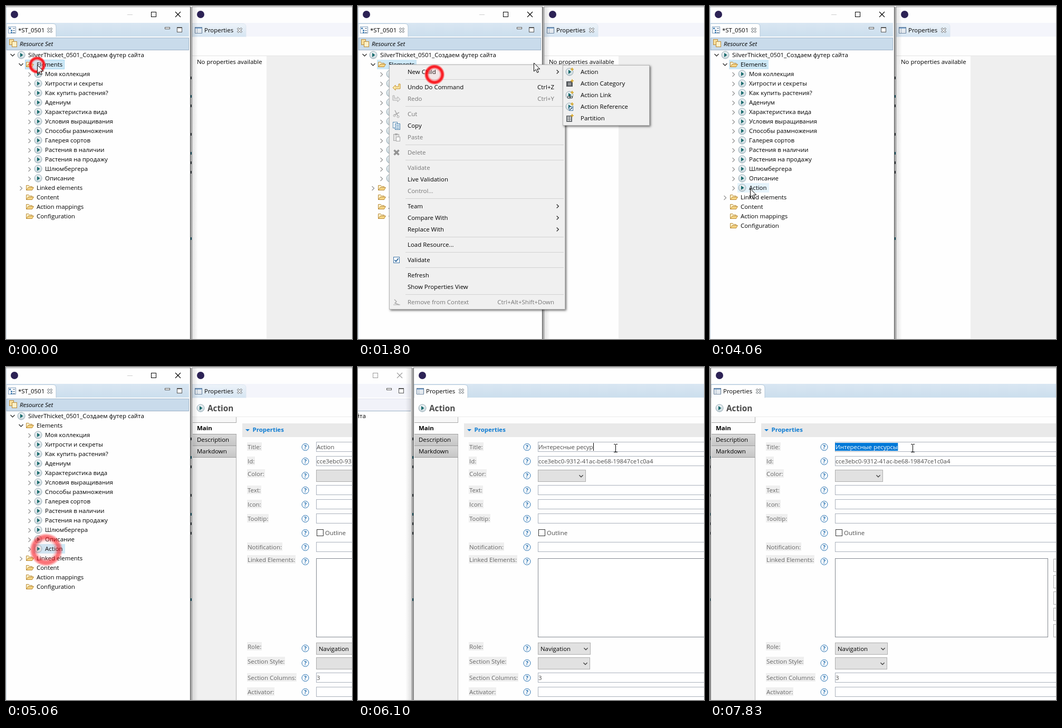
Write an HTML page with a canvas that moves like this. It is 656x632 px and loops after 8 s.

```html
<!DOCTYPE html>
<html lang="en">
<head>
<meta charset="utf-8">
<title>Tree editor demo</title>
<style>
html, body { margin: 0; width: 100%; height: 100%; overflow: hidden; background: #fff; }
canvas { display: block; }
</style>
</head>
<body>
<canvas id="stage" width="656" height="632"></canvas>
<script>
const g = document.getElementById('stage').getContext('2d');
const LOOP = 8000;
const FONT = '"Open Sans", "Noto Sans", sans-serif';
const SIZE = 11.45;

// Events on the timeline, in ms
const MENU_ON = 150, SUB_ON = 1330, MENU_OFF = 2760, ADDED = 2900;
const PICK = 4260, FORM_ON = 4480, FOCUS = 5070;
const TYPE_FROM = 5180, TYPE_STEP = 36;

const TITLE = 'Интересные ресурсы';
const CHILDREN = ['Моя коллекция', 'Хитрости и секреты', 'Как купить растения?', 'Адениум',
  'Характеристика вида', 'Условия выращивания', 'Способы размножения', 'Галерея сортов',
  'Растения в наличии', 'Растения на продажу', 'Шлюмбергера', 'Описание'];

// Cursor stops: time, x, y
const PATH = [[0, 59, 112], [850, 59, 112], [1220, 145, 130], [1480, 145, 130], [1800, 333, 108],
  [1860, 333, 108], [2340, 425, 121], [3340, 425, 121], [3860, 82, 358], [4040, 76, 347],
  [4480, 76, 347], [5000, 735, 154]];
// Clicks: time, x, y
const CLICKS = [[-440, 59, 112], [1290, 145, 130], [2410, 425, 122], [4230, 76, 347]];
const RING_MS = 1300;

// Menu rows: label, y, shortcut, kind (d = disabled, s = has submenu)
const MENU = [['New Child', 125, '', 's'], ['Undo Do Command', 154, 'Ctrl+Z'], ['Redo', 176, 'Ctrl+Y', 'd'],
  ['Cut', 205, '', 'd'], ['Copy', 227], ['Paste', 249, '', 'd'], ['Delete', 278, '', 'd'],
  ['Validate', 307, '', 'd'], ['Live Validation', 329], ['Control...', 351, '', 'd'],
  ['Team', 380, '', 's'], ['Compare With', 402, '', 's'], ['Replace With', 424, '', 's'],
  ['Load Resource...', 453], ['Validate', 482], ['Refresh', 511], ['Show Properties View', 533],
  ['Remove from Context', 562, 'Ctrl+Alt+Shift+Down', 'd']];
const SEPARATORS = [139, 190, 263, 292, 365, 438, 467, 496, 547];
const SUBMENU = ['Action', 'Action Category', 'Action Link', 'Action Reference', 'Partition'];

// Form rows: label, label y, help icon y, kind
const FIELDS = [['Title:', 152, 152, 'in'], ['Id:', 179, 179, 'in'], ['Color:', 203, 206, 'combo'],
  ['Text:', 234, 234, 'in'], ['Icon:', 261, 261, 'in'], ['Tooltip:', 288, 288, 'in'],
  ['', 315, 315, 'check'], ['Notification:', 342, 342, 'in'], ['Linked Elements:', 366, 369, 'list'],
  ['Role:', 531, 534, 'combo'], ['Section Style:', 559, 562, 'combo'],
  ['Section Columns:', 590, 590, 'in'], ['Activator:', 617, 617, 'in']];

const clamp = v => Math.max(0, Math.min(1, v));
const ease = u => (1 - Math.cos(Math.PI * clamp(u))) / 2;
const inside = (p, x0, y0, x1, y1) => p.x >= x0 && p.x < x1 && p.y >= y0 && p.y < y1;

function cursorAt(t) {
  let i = 0;
  while (i < PATH.length - 2 && t >= PATH[i + 1][0]) i++;
  const [t0, x0, y0] = PATH[i], [t1, x1, y1] = PATH[i + 1];
  const e = ease((t - t0) / (t1 - t0));
  return { x: x0 + (x1 - x0) * e, y: y0 + (y1 - y0) * e };
}

function rect(x, y, w, h, fill, stroke) {
  if (fill) { g.fillStyle = fill; g.fillRect(x, y, w, h); }
  if (stroke) { g.strokeStyle = stroke; g.lineWidth = 1; g.strokeRect(x + .5, y + .5, w - 1, h - 1); }
}
function line(pts, color, width = 1) {
  g.beginPath();
  pts.forEach(([x, y]) => g.lineTo(x, y));
  g.strokeStyle = color; g.lineWidth = width; g.stroke();
}
function poly(pts, fill, stroke, width = 1) {
  g.beginPath();
  pts.forEach(([x, y]) => g.lineTo(x, y));
  g.closePath();
  if (fill) { g.fillStyle = fill; g.fill(); }
  if (stroke) { g.strokeStyle = stroke; g.lineWidth = width; g.stroke(); }
}
function disc(x, y, r, fill, stroke) {
  g.beginPath(); g.arc(x, y, r, 0, 7);
  if (fill) { g.fillStyle = fill; g.fill(); }
  if (stroke) { g.strokeStyle = stroke; g.lineWidth = 1; g.stroke(); }
}
function gradient(x0, y0, x1, y1, a, b) {
  const grad = g.createLinearGradient(x0, y0, x1, y1);
  grad.addColorStop(0, a); grad.addColorStop(1, b);
  return grad;
}
const vgrad = (y0, y1, a, b) => gradient(0, y0, 0, y1, a, b);

function setFont(style = '', size = SIZE) { g.font = `${style} ${size}px ${FONT}`; }
function text(s, x, y, color = '#000', style = '', size = SIZE, align = 'left') {
  setFont(style, size);
  g.fillStyle = color; g.textAlign = align;
  g.fillText(s, x, Math.round(y + size * .36));
}
function width(s) { setFont(); return g.measureText(s).width; }
function cross(x, y, r, color, w) {
  line([[x - r, y - r], [x + r, y + r]], color, w);
  line([[x - r, y + r], [x + r, y - r]], color, w);
}
function chevron(x, y, dir, color, r = 4) {
  line(dir === 'down' ? [[x - r, y - r / 2], [x, y + r / 2], [x + r, y - r / 2]]
    : [[x - r / 2, y - r], [x + r / 2, y], [x - r / 2, y + r]], color, 1.4);
}

function playIcon(x, y) {
  disc(x, y, 7, vgrad(y - 7, y + 7, '#edf2f4', '#cbd8dd'), '#93a8b2');
  poly([[x - 2, y - 4], [x + 3.5, y], [x - 2, y + 4]], '#176a6c');
}
function folder(x, y) {
  poly([[x + .5, y + 4.5], [x + .5, y - 4.5], [x + 5, y - 4.5], [x + 6.5, y - 2.5], [x + 11.5, y - 2.5], [x + 11.5, y + 4.5]], '#fdf1cb', '#b98a38');
  poly([[x + .8, y + 4.5], [x + 4, y - .5], [x + 14.5, y - .5], [x + 11.5, y + 4.5]], '#f6d584', '#b98a38');
}
function tabClose(x, y) {
  cross(x, y, 4, '#6f767c', 3.6);
  cross(x, y, 3.6, '#fff', 1.5);
}

function titleBar(x, w) {
  rect(x, 0, w, 32, '#fefefe');
  rect(x, 1, w, 1, '#8a8a8a');
  disc(x + 16, 16, 7, '#2c2255');
}
function tabStrip(x, w, tabEnd, active) {
  rect(x, 32, w, 26, active ? vgrad(32, 58, '#d9e6f2', '#cbdeed') : '#f4f5fb');
  g.beginPath();
  g.moveTo(x, 58.5); g.lineTo(x, 33.5); g.lineTo(tabEnd - 6, 33.5);
  g.quadraticCurveTo(tabEnd, 33.5, tabEnd, 40); g.lineTo(tabEnd, 58.5);
  g.fillStyle = active ? '#fefefe' : vgrad(33, 58, '#edf3f9', '#d6e5f2');
  g.fill();
  g.strokeStyle = active ? '#b4c8da' : '#dde7f1'; g.lineWidth = 1; g.stroke();
}

function treeRows(t) {
  const rows = [['root', 'SilverThicket_0501_Создаем футер сайта', 0], ['folder', 'Elements', 1]];
  CHILDREN.forEach(s => rows.push(['play', s, 2]));
  if (t >= ADDED) rows.push(['play', 'Action', 2]);
  ['Linked elements', 'Content', 'Action mappings', 'Configuration'].forEach(s => rows.push(['folder', s, 1]));
  return rows;
}

function drawTree(t, p, focused) {
  const selected = t < PICK ? 'Elements' : 'Action';
  const menuOpen = t >= MENU_ON && t < MENU_OFF;
  treeRows(t).forEach(([kind, label, depth], i) => {
    const y = 93 + i * 18, tx = 42 + depth * 16, x0 = tx - 22, w = Math.round(width(label)) + 26;
    const hover = !menuOpen && inside(p, x0, y - 9, x0 + w, y + 9);
    if (label === selected) rect(x0, y - 9, w, 18, focused ? '#cde8f6' : '#d9d9d9', focused && hover ? '#a3d5ef' : '');
    else if (hover) rect(x0, y - 9, w, 18, '#e5f3fb');
    const ax = tx - 30;
    if (kind === 'root' || label === 'Elements') chevron(ax + .5, y, 'down', '#333');
    else if (kind === 'play' || label === 'Linked elements') chevron(ax + .5, y + 1, 'right', '#979797');
    if (kind === 'folder') folder(tx - 20, y); else playIcon(tx - 13, y);
    text(label, tx, y);
  });
}

function drawLeft(t, p) {
  const active = t < FOCUS;
  rect(0, 0, 349, 632, '#fefefe');
  titleBar(0, 349);
  const ink = active ? '#000' : '#9a9a9a';
  line([[230, 16.5], [240, 16.5]], active ? '#cdcdcd' : '#dedede');
  rect(275, 11, 10, 10, '', ink);
  cross(326, 16, 5, ink, 1.1);
  tabStrip(1, 346, 95, active);
  rect(4, 39, 15, 13, '#fff', '#7e9dbd');
  [42, 46, 50].forEach((y, i) => {
    rect(i ? 9 : 6, y - 1, 3, 3, '#4d86b8');
    rect(13, y, 4, 1, '#556f88');
  });
  text('*ST_0501', 23, 46);
  tabClose(83, 46);
  rect(301, 40, 10, 4, '#fff', '#555');
  rect(324, 40, 10, 10, '#fff', '#555');
  rect(324, 40, 10, 2, '#555');
  rect(1, 60, 346, 24, active ? '#c9dbeb' : '#f1f2f9', active ? '#9fb6cb' : '#dfe3ec');
  rect(1, 83, 346, 1, '#9bb0c5');
  rect(6, 63, 9, 11, '#f7df9e', '#b98a38');
  rect(11, 67, 10, 11, '#fdf0c6', '#b98a38');
  text('Resource Set', 26, 72, '#000', active ? 'italic' : '');
  drawTree(t, p, active);
  rect(0, 2, 1, 630, '#c9d8e6');
}

// Sliver of the desktop between the windows; the focused window casts its shadow over it
function drawGap(t) {
  rect(349, 0, 4, 632, '#f4f4f4');
  [136, 171, 189, 243, 279, 297, 315, 441].forEach((y, i) =>
    rect(350, y - 2, 2, 5, i % 3 === 1 ? '#2b7285' : '#4e5559'));
  const active = t < FOCUS;
  rect(349, 1, 1, 631, active ? '#6a6a6a' : '#b0b0b0');
  rect(352, 1, 1, 631, active ? '#a8a8a8' : '#6a6a6a');
  const dark = 'rgba(0,0,0,.34)', mid = 'rgba(0,0,0,.1)', none = 'rgba(0,0,0,0)';
  const [from, to] = active ? [349, 364] : [352, 337];
  const shade = gradient(from, 0, to, 0, dark, none);
  shade.addColorStop(.35, mid);
  rect(Math.min(from, to), 2, 15, 630, shade);
}

function drawCombo(y, w, label) {
  rect(588, y - 11, w, 23, '#e1e1e1', '#adadad');
  chevron(588 + w - 9, y + 1, 'down', '#444', 3.6);
  if (label) text(label, 593, y + 1);
}

function drawTitle(t) {
  let count = Math.min(15, Math.floor((t - TYPE_FROM) / TYPE_STEP) + 1);
  if (t >= 5880) count = 16;
  if (t >= 6660) count = 18;
  const shown = t < TYPE_FROM ? 'Action' : TITLE.slice(0, count);
  const x = 589, end = x + width(shown);
  text(shown, x, 152, '#4c4c4c');
  if (t >= 7600) {
    const from = t < 7830 ? x + width('Интересные ') : x - 1;
    rect(from, 144, end - from + .5, 15, '#0078d7');
    g.save();
    g.beginPath(); g.rect(from, 144, end - from + 1, 15); g.clip();
    text(shown, x, 152, '#fff');
    g.restore();
  } else if (t >= FOCUS && t < 6430 || t >= 6660 && t < 7200) {
    rect(Math.round(end), 144, 1, 15, '#000');
  }
}

function drawForm(t) {
  playIcon(369, 78);
  text('Action', 382, 78, '#4a4a4a', 'bold', 15.3);
  rect(353, 94, 654, 1, '#ebebeb');
  // Side tabs
  rect(354, 95, 83, 537, '#f0f0f0');
  rect(354, 95, 83, 10, '#f7f7f7');
  rect(354, 105, 83, 1, '#a6a6a6');
  rect(436, 95, 1, 537, '#b0b0b0');
  rect(354, 106, 83, 21, '#fefefe');
  ['Description', 'Markdown'].forEach((s, i) => {
    const y = 127 + i * 22;
    rect(354, y, 82, 22, vgrad(y, y + 22, '#d9d9d9', '#c6c6c6'));
    rect(354, y, 83, 1, '#9c9c9c');
    text(s, 362, y + 11);
  });
  rect(354, 171, 83, 1, '#9c9c9c');
  text('Main', 362, 116, '#000', 'bold');
  // Section header
  rect(448, 107, 559, 26, '#e9e9e9');
  poly([[454, 118], [462, 118], [458, 122]], '#0b7bd3');
  text('Properties', 467.5, 119, '#0b7bd3', 'bold');

  FIELDS.forEach(([label, y, iy, kind]) => {
    if (label) {
      rect(457, y - 9, Math.round(width(label)) + 2, 16, '#efefef');
      text(label, 458, y, '#666');
    }
    disc(567.5, iy, 6.5, '#fff', '#1f6cae');
    text('?', 567.5, iy, '#1f6cae', 'bold', 10.5, 'center');
    if (kind === 'in') rect(588, iy - 10, 450, 19, '#fff', '#a9b0bb');
  });
  drawCombo(206, 91);
  drawCombo(534, 100, 'Navigation');
  drawCombo(562, 99);
  text('cce3ebc0-9312-41ac-be68-19847ce1c0a4', 589, 179, '#4c4c4c');
  text('3', 589, 590, '#4c4c4c');
  rect(589, 308, 13, 13, '#fff', '#333');
  text('Outline', 605, 315, '#4c4c4c');
  rect(588, 363, 404, 150, '#fff', '#82878f');
  for (let i = 0; i < 5; i++) rect(1002, 364 + i * 31, 40, 25, '#fdfdfd', '#adadad');
  drawTitle(t);
}

function drawRight(t) {
  rect(353, 0, 654, 632, '#fefefe');
  titleBar(353, 654);
  tabStrip(353, 654, 455, t >= FOCUS);
  rect(358, 40, 14, 12, '#fff', '#5c7896');
  rect(359, 41, 12, 2, '#7ba3cc');
  rect(362, 43, 1, 8, '#9ab');
  [45, 48].forEach(y => rect(359, y, 12, 1, '#b9c7d6'));
  text('Properties', 376, 46);
  tabClose(443, 46);
  if (t >= FORM_ON) return drawForm(t);
  rect(353, 94, 654, 1, '#e3e3e3');
  rect(494, 95, 513, 536, '#efefef');
  text('No properties available', 362, 106);
}

function menuBox(x, y, w, h) {
  g.save();
  g.shadowColor = 'rgba(0,0,0,.55)'; g.shadowBlur = 4; g.shadowOffsetX = g.shadowOffsetY = 2;
  rect(x, y, w, h, '#f0f0f0');
  g.restore();
  rect(x, y, w, h, '', '#b4b4b4');
}

function arrowIcon(y, dir, fill, stroke) {
  const at = (dx, dy) => [73 + dx * dir, y + dy];
  poly([at(-7, 1), at(-2, -4), at(-2, -1), at(4, -1), at(4, -6), at(7, -6), at(7, 3), at(-2, 3), at(-2, 6)], fill, stroke);
}
function menuIcons() {
  arrowIcon(154, 1, '#fbe6a4', '#c3922e');
  arrowIcon(176, -1, '#e6e6e6', '#b0b0b0');
  const gray = '#a8a8a8';
  line([[70, 198], [75, 208]], gray, 1.5);
  line([[78, 202], [69, 207]], gray, 1.5);
  disc(69, 208, 2, '', gray); disc(76, 210, 2, '', gray);
  rect(66, 220, 9, 12, '#fff', '#4d82ad');
  rect(70, 223, 10, 12, '#eaf4fb', '#4d82ad');
  [226, 229, 232].forEach(y => rect(72, y, 6, 1, '#4d82ad'));
  rect(67, 243, 11, 13, '#e2e2e2', gray);
  rect(70, 242, 5, 3, gray);
  rect(72, 248, 8, 9, '#f6f6f6', gray);
  cross(73, 278, 4.5, '#929292', 3.6);
  rect(67, 476, 12, 12, '#fff', '#3e75a8');
  line([[69.5, 482], [72, 485], [76.5, 479]], '#1f5d96', 1.7);
  line([[69, 557], [73, 561], [70, 564], [78, 567]], gray, 1.4);
  line([[67, 567], [80, 567]], gray);
}

function subIcon(i, y) {
  const x = 401;
  if (i === 1) {
    rect(x - 6, y - 4, 12, 10, '#55595d');
    rect(x - 3, y - 1, 6, 1, '#fff'); rect(x - 3, y + 2, 6, 1, '#fff');
  } else if (i === 4) {
    rect(x - 6, y - 5, 11, 12, '#666b6f');
    for (let k = 0; k < 6; k++) rect(x - 4 + k % 2 * 4, y - 3 + (k >> 1) * 3, 3, 2, '#e8e8e8');
  } else {
    playIcon(x, y);
    if (i === 2) { rect(x - 4, y + 2, 6, 4, '#fff', '#444'); rect(x, y + 2, 6, 4, '', '#444'); }
    if (i === 3) { rect(x - 1, y, 8, 8, '#fff', '#356b9a'); line([[x + 1, y + 6], [x + 5, y + 2]], '#123f6b', 1.6); }
  }
  line([[x + 5, y - 8], [x + 5, y - 2]], '#d9a520', 1.6);
  line([[x + 2, y - 5], [x + 8, y - 5]], '#d9a520', 1.6);
}

function drawMenus(t, p) {
  if (t < MENU_ON || t >= MENU_OFF) return;
  const sub = t >= SUB_ON;
  const inSub = sub && inside(p, 388, 112, 553, 227);
  menuBox(59, 111, 334, 465);
  if (inSub || inside(p, 62, 114, 390, 136)) rect(62, 114, 328, 22, '#91c9f7');
  SEPARATORS.forEach(y => rect(90, y, 300, 1, '#d2d2d2'));
  MENU.forEach(([label, y, keys, kind]) => {
    const ink = kind === 'd' ? '#777' : '#000';
    text(label, 94, y, ink);
    if (keys) text(keys, 372, y, ink, '', SIZE, 'right');
    if (kind === 's') chevron(378.5, y, 'right', '#333', 3.6);
  });
  menuIcons();
  if (!sub) return;
  menuBox(388, 112, 165, 115);
  SUBMENU.forEach((label, i) => {
    const y = 125 + i * 22;
    if (inSub && p.y >= y - 11 && p.y < y + 11) rect(390, y - 11, 160, 22, '#91c9f7');
    subIcon(i, y);
    text(label, 422, y);
  });
}

// A red dot that opens into a soft ring, grows and fades
function drawRings(t) {
  CLICKS.forEach(([start, x, y]) => {
    const u = (t - start) / RING_MS;
    if (u <= 0 || u >= 1) return;
    const r = 50 * u, open = clamp((u - .2) / .14), grad = g.createRadialGradient(x, y, 0, x, y, r);
    const core = `rgba(${225 + 30 * open},${15 + 150 * open},${20 + 145 * open},${1 - .88 * open})`;
    grad.addColorStop(0, core);
    grad.addColorStop(.45, core);
    grad.addColorStop(.7, 'rgba(250,12,20,.95)');
    grad.addColorStop(.84, 'rgba(250,15,22,.9)');
    grad.addColorStop(1, 'rgba(255,40,40,0)');
    g.globalAlpha = clamp((1 - u) / .58);
    disc(x, y, r, grad);
    g.globalAlpha = 1;
  });
}

function drawCursor(p) {
  if (p.x > 690) {
    const x = Math.round(p.x), y = Math.round(p.y);
    rect(x, y - 7, 1, 15, '#000');
    [-8, 7].forEach(d => { rect(x - 3, y + d, 3, 1, '#000'); rect(x + 1, y + d, 3, 1, '#000'); });
    return;
  }
  const shape = [[0, 0], [0, 16], [3.7, 12.6], [6.3, 18.5], [8.8, 17.4], [6.2, 11.6], [11.3, 11.6]];
  poly(shape.map(([x, y]) => [p.x + .5 + x, p.y + y]), '#fff', '#000');
}

function draw(t) {
  const pan = Math.round(351 * ease((t - 5504) / 943));
  const p = cursorAt(t);
  g.setTransform(1, 0, 0, 1, 0, 0);
  rect(0, 0, 656, 632, '#fefefe');
  g.translate(-pan, 0);
  drawLeft(t, p);
  drawRight(t);
  drawGap(t);
  drawMenus(t, p);
  drawRings(t);
  drawCursor(p);
}

const begin = performance.now();
function tick() {
  draw((performance.now() - begin) % LOOP);
  requestAnimationFrame(tick);
}
tick();
</script>
</body>
</html>
```
